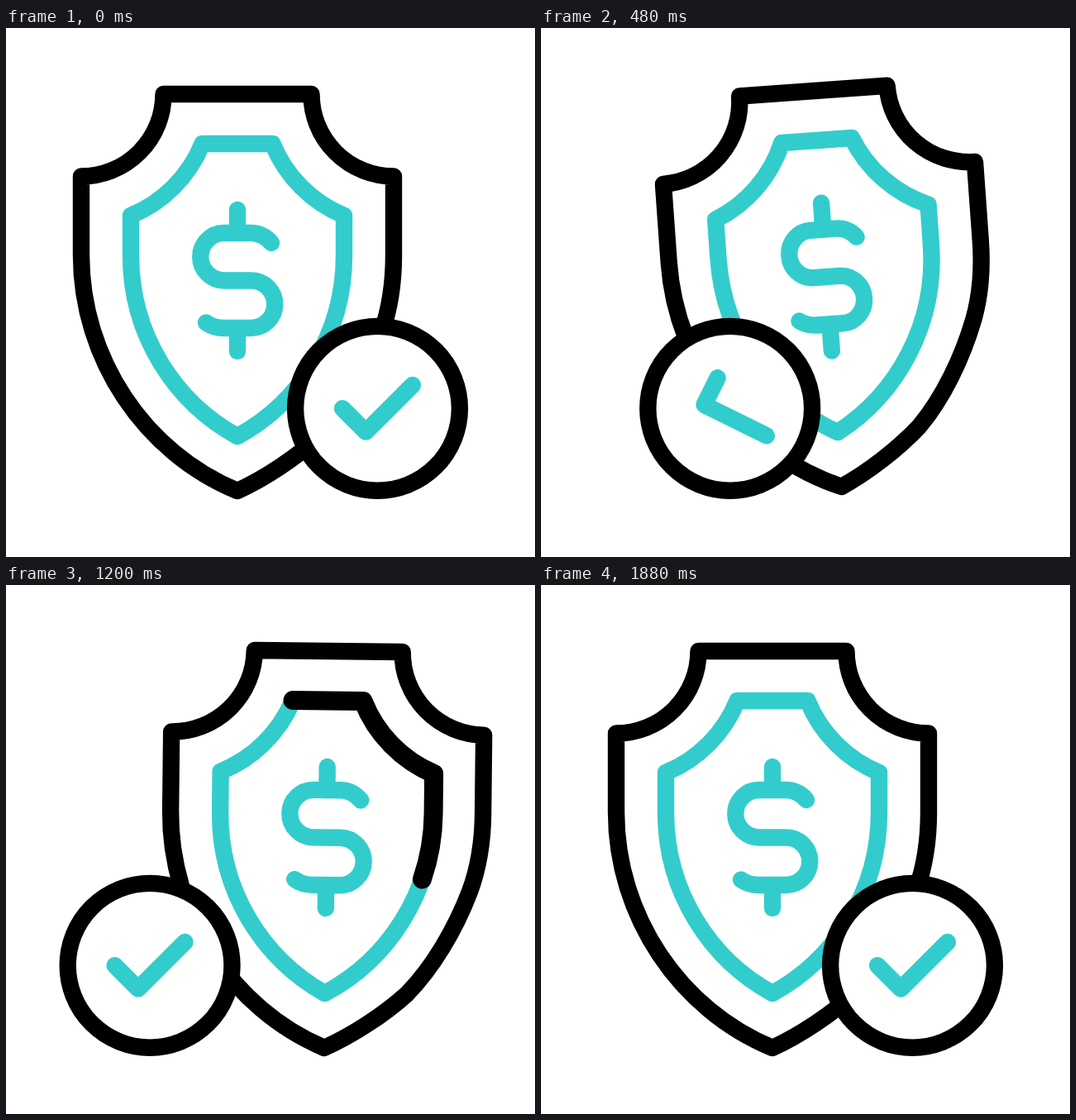
An HTML page with a canvas for the animation above (2 s loop, 640 by 640 pixels).

```html
<!DOCTYPE html>
<html lang="en">
<head>
<meta charset="utf-8">
<title>Secure payment</title>
<style>
  html, body { margin: 0; width: 100%; height: 100%; overflow: hidden; background: #fff; }
  canvas { display: block; width: 640px; height: 640px; }
</style>
</head>
<body>
<canvas id="stage" width="640" height="640"></canvas>
<script>
const ctx = document.getElementById('stage').getContext('2d');
const LOOP = 2000, STEP = 40, LINE = 20.4;
const BLACK = '#000', TEAL = '#33cccc';

// All shield parts are drawn around the bottom tip, which is the pivot.
const outer = new Path2D(
  'M-89.5 -480 H89.5 A99.5 99.5 0 0 0 189 -380.5 V-285 ' +
  'C189 -249 184 -219 174 -191 C157 -145 130 -98 99 -66 C72 -41 33 -15 0 0 ' +
  'C-112 -46 -189 -160 -189 -285 V-380.5 A99.5 99.5 0 0 0 -89.5 -480 Z');

// Runs counter-clockwise from the top left corner, so the trail can follow it.
const innerData =
  'M-42.5 -420 A159 159 0 0 1 -129 -333 V-285 C-129 -188 -75 -107 0 -66 ' +
  'C75 -107 129 -188 129 -285 V-333 A159 159 0 0 1 42.5 -420 Z';
const inner = new Path2D(innerData);
const dollar = new Path2D(
  'M41 -300 Q31 -312 16 -312 H-16 A28.75 28.75 0 0 0 -16 -254.5 ' +
  'H16.5 A28.75 28.75 0 0 1 16.5 -197 H-16 Q-29 -197 -38 -203.5');

const probe = document.createElementNS('http://www.w3.org/2000/svg', 'path');
probe.setAttribute('d', innerData);
const innerLength = probe.getTotalLength();

const rad = deg => deg * Math.PI / 180;

// Smooth rise from 0 at time a to 1 at time b; falls from 1 to 0 when b < a.
function ease(t, a, b) {
  const u = Math.min(1, Math.max(0, (t - a) / (b - a)));
  return u * u * (3 - 2 * u);
}

// Leans left, tips over to the right, then stands upright again.
const sway = (t, a, b, c, d) =>
  -10 * ease(t, a, b) + 14 * ease(t, b, c) - 4 * ease(t, c, d);

// Swings up, then down past zero, then rests.
const wobble = (t, up, down) =>
  up * ease(t, 400, 640) - (up + down) * ease(t, 640, 960) + down * ease(t, 960, 1200);

function stroke(path, color, width = LINE) {
  ctx.strokeStyle = color;
  ctx.lineWidth = width;
  ctx.stroke(path);
}

function polyline(...points) {
  const path = new Path2D();
  points.forEach(([x, y]) => path.lineTo(x, y));
  return path;
}

function drawTrail(t) {
  const tail = ease(t, 840, 1440) * innerLength;
  const size = ease(t, 640, 1120) * innerLength - tail;
  if (size < 0.5) return;
  ctx.setLineDash([size, innerLength * 2]);
  ctx.lineDashOffset = -tail;
  stroke(inner, BLACK, 23);
  ctx.setLineDash([]);
}

// The sign gets narrower as its bars grow longer.
function drawDollar(t) {
  const grow = wobble(t, 16, 3);
  const sign = new Path2D();
  sign.addPath(dollar, new DOMMatrix([1 - grow * 0.0085, 0, 0, 1, 0, 0]));
  stroke(polyline([0, -340 - grow], [0, -312]), TEAL);
  stroke(polyline([0, -197], [0, -169 + grow]), TEAL);
  stroke(sign, TEAL);
}

function drawShield(t, p) {
  const hop = 4 * p * (1 - p);
  const lean = t < 1000 ? sway(t, 80, 350, 640, 840) : sway(t, 1880, 1680, 1320, 1160);
  ctx.save();
  ctx.translate(280 + 105 * p - hop, 560 - 8 * hop);
  ctx.rotate(rad(lean));
  stroke(outer, BLACK);
  stroke(inner, TEAL);
  drawTrail(t);
  drawDollar(t);
  ctx.restore();
}

function drawBadge(t, p) {
  ctx.save();
  ctx.translate(449.5 - 275.4 * p, 460.3);
  const disc = new Path2D();
  disc.arc(0, 0, 99.4, 0, Math.PI * 2);
  ctx.fillStyle = '#fff';
  ctx.fill(disc);
  stroke(disc, BLACK);
  ctx.rotate(rad(360 * (ease(t, 1280, 1856) - ease(t, 80, 640))));
  const a = (40 - wobble(t, 14, 14)) * Math.SQRT1_2;
  const b = (80 + wobble(t, 16, 21)) * Math.SQRT1_2;
  stroke(polyline([-14.2 - a, 28.2 - a], [-14.2, 28.2], [-14.2 + b, 28.2 - b]), TEAL);
  ctx.restore();
}

function draw(now) {
  const t = Math.floor((now % LOOP) / STEP) * STEP;
  const p = ease(t, 80, 640) - ease(t, 1320, 1880);
  ctx.fillStyle = '#fff';
  ctx.fillRect(0, 0, 640, 640);
  ctx.lineCap = ctx.lineJoin = 'round';
  drawShield(t, p);
  drawBadge(t, p);
}

const begin = performance.now();
function tick() {
  draw(performance.now() - begin);
  requestAnimationFrame(tick);
}
tick();
</script>
</body>
</html>
```
